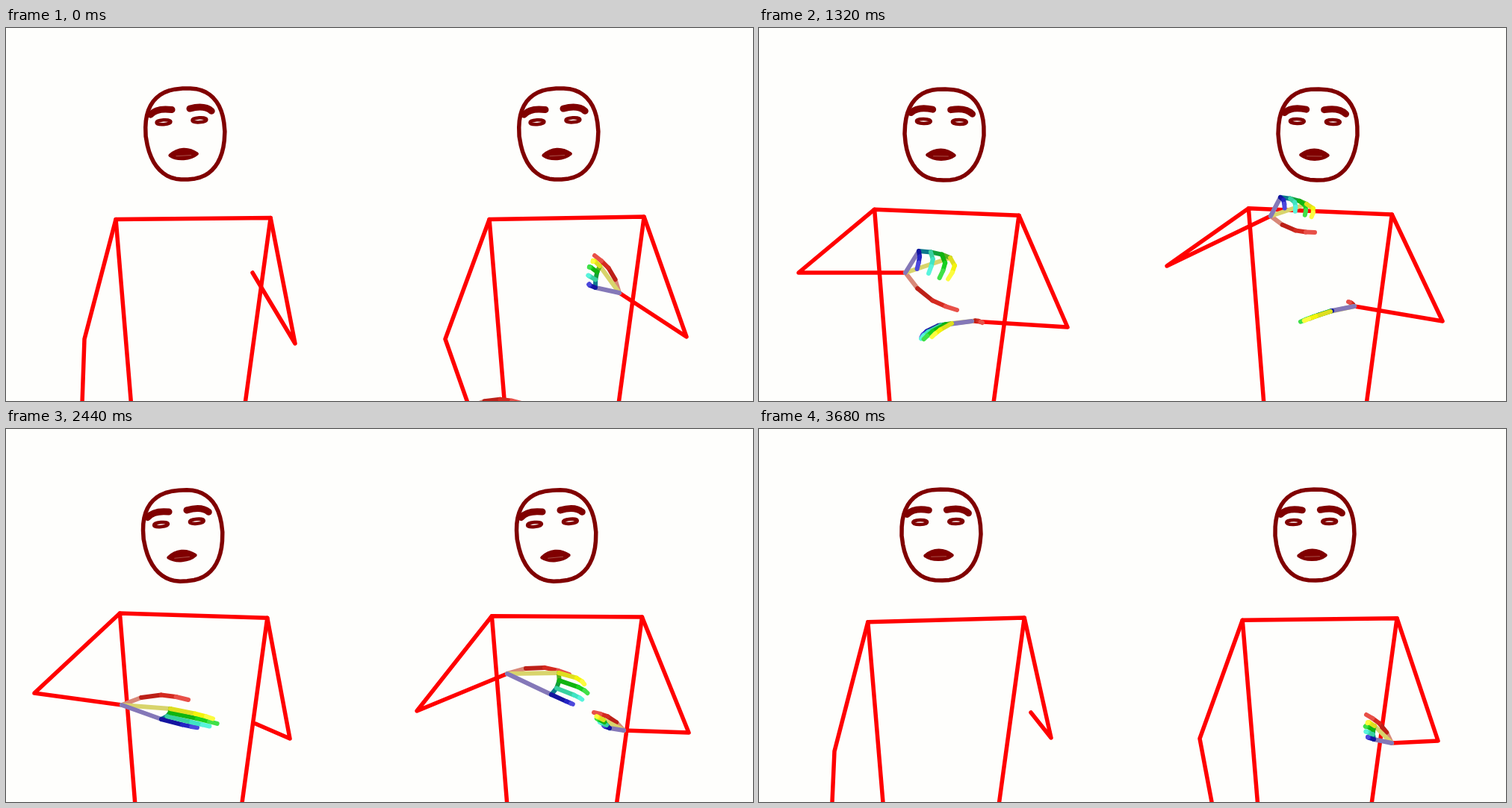
An HTML page with a canvas for the animation above (3720 ms loop, 1000 px wide and 500 px high).

```html
<!DOCTYPE html>
<html lang="en">
<head>
<meta charset="utf-8">
<title>Pose pair</title>
<style>
html, body { margin: 0; width: 100%; height: 100%; overflow: hidden; background: #fefefc; }
canvas { display: block; width: 1000px; height: 500px; }
</style>
</head>
<body>
<canvas id="stage" width="1000" height="500"></canvas>
<script>
const ctx = document.getElementById('stage').getContext('2d');
const LOOP = 3720, STEP = 40;
const TIMES = [0, 880, 1320, 1760, 2440, 2960, 3680];

// Centre of the head; both figures share it
const head = [[240,142], [248,143], [248,143], [248,136], [237,143], [236,143], [244,142]];

// arms: left elbow, left wrist, right elbow, right wrist
// hands: index knuckle, little knuckle, finger direction, thumb tip, all from the wrist
const figures = [
  {
    x: 0, swing: 35,
    arms: [
      [105,417, 100,560, 387,423, 330,328],
      [33,312, 170,266, 417,394, 313,368],
      [53,328, 196,328, 413,401, 285,393],
      [22,353, 70,469, 422,384, 394,540],
      [38,354, 155,370, 380,415, 334,395],
      [107,390, 193,381, 377,413, 300,399],
      [101,432, 95,568, 391,414, 364,380]
    ],
    left: { first: 1, rows: [
      [45,-30, 32,-44, 25,28, 82,37],
      [60,-20, 18,-29, -3,30, 69,50],
      [18,47, -33,45, 0,50, 46,75],
      [65,5, 53,19, 60,14, 89,-7],
      [55,4, 49,17, 46,8, 93,3]
    ] },
    right: { first: 1, from: 400, to: 1720, rows: [
      [-30,-1, -47,2, -32,18, -11,-10],
      [-27,3, -45,6, -28,19, 14,2]
    ] }
  },
  {
    x: 500, swing: 18,
    arms: [
      [88,417, 120,508, 411,414, 321,355],
      [54,297, 188,231, 415,397, 295,386],
      [46,319, 185,252, 415,393, 297,373],
      [52,344, 70,357, 414,397, 393,494],
      [50,378, 171,328, 414,407, 327,404],
      [65,388, 199,334, 411,405, 302,386],
      [90,415, 110,521, 409,418, 347,421]
    ],
    left: { first: 0, rows: [
      [50,20, 40,35, 15,10, 70,-5],
      [52,-16, 12,-26, 16,10, 60,27],
      [48,-16, 13,-25, 7,18, 59,22],
      [22,47, -27,45, -1,52, 43,75],
      [69,-1, 59,28, 36,16, 83,1],
      [68,-3, 55,31, 22,16, 70,-3]
    ] },
    right: { first: 0, rows: [
      [-26,-36, -32,-7, -10,-6, -33,-50],
      [-35,5, -40,11, -32,11, -27,-6],
      [-32,7, -30,6, -37,13, -8,-6],
      [-40,6, -18,35, -10,27, -55,6],
      [-27,-14, -19,-3, -10,-5, -40,-24],
      [-26,-28, -28,2, -9,-3, -33,-44],
      [-23,-23, -24,-5, -10,-4, -34,-38]
    ] }
  }
];

const DARK = '#800000', RED = '#ff0000';
const THUMB = ['#d88878', '#bc2018', '#d42a20', '#e85048'];
const FINGERS = [
  { reach: 0.95, colors: ['#dede20', '#f4f40c', '#fcfc40'] },
  { reach: 1.05, colors: ['#10b410', '#18d020', '#40e048'] },
  { reach: 0.95, colors: ['#38d0a0', '#40e4c4', '#58f4dc'] },
  { reach: 0.8, colors: ['#1414a0', '#2424c4', '#4c48dc'] }
];
const KNUCKLES = ['#58b020', '#10a038', '#0c788c'];

const clamp = (v, a, b) => Math.max(a, Math.min(b, v));
const mix = (a, b, u) => a.map((v, i) => v + (b[i] - v) * u);
const sum = (p, kp, q, kq) => p.map((v, i) => v * kp + q[i] * kq);
const bend = (v, n) => Math.sign(v) * Math.abs(v) ** n;
const pairs = a => Array.from({ length: a.length / 2 }, (_, i) => a.slice(2 * i, 2 * i + 2));

function phase(t) {
  let i = 0;
  while (i < TIMES.length - 2 && t >= TIMES[i + 1]) i++;
  const u = (t - TIMES[i]) / (TIMES[i + 1] - TIMES[i]);
  return { t, i, u: (1 - Math.cos(Math.PI * u)) / 2, bump: Math.sin(Math.PI * u) };
}

function pose(rows, p, first = 0) {
  const at = n => rows[clamp(n - first, 0, rows.length - 1)];
  return mix(at(p.i), at(p.i + 1), p.u);
}

function trace(pts, color, width) {
  ctx.beginPath();
  pts.forEach(q => ctx.lineTo(q[0], q[1]));
  ctx.strokeStyle = color;
  ctx.lineWidth = width;
  ctx.stroke();
}

const chain = (pts, colors) => colors.forEach((c, i) => trace([pts[i], pts[i + 1]], c, 6));

function drawHead(x, y) {
  ctx.save();
  ctx.translate(x, y);
  ctx.rotate((x % 500 - 246) * 0.01); // leans towards the side it moves to
  const outline = Array.from({ length: 49 }, (_, i) => {
    const a = i * Math.PI / 24, s = bend(Math.sin(a), 0.8);
    return [53 * bend(Math.cos(a), 0.8) * (1 - 0.1 * Math.max(0, s)), 61 * s];
  });
  trace(outline, DARK, 5.5);
  ctx.translate(-4, -17.5);
  for (const side of [-1, 1]) {
    ctx.beginPath();
    ctx.moveTo(41 * side, -11);
    ctx.quadraticCurveTo(32 * side, -20, 12 * side, -16);
    ctx.lineWidth = 9;
    ctx.stroke();
    ctx.beginPath();
    ctx.ellipse(24 * side, 0, 9.5, 3, 0, 0, 7);
    ctx.lineWidth = 4.5;
    ctx.stroke();
  }
  ctx.fillStyle = DARK;
  ctx.beginPath();
  ctx.moveTo(-18, 45);
  ctx.bezierCurveTo(-7, 36, 7, 36, 18, 45);
  ctx.bezierCurveTo(9, 52, -9, 52, -18, 45);
  ctx.fill();
  ctx.stroke();
  trace([[-10, 46.5], [10, 46.5]], '#a85048', 1);
  ctx.restore();
}

function drawBody([le, lw, re, rw]) {
  // a raised elbow lifts its shoulder and draws both together
  const rise = le[1] - 300;
  const ls = [157 - rise * 0.085, 239 + rise * 0.15];
  const rs = [346 + rise * 0.07, 251 + (re[1] - 400) * 0.15];
  trace([lw, le, ls, rs, re, rw], RED, 5.5);
  trace([ls, [ls[0] + 21, 510]], RED, 5.5);
  trace([rs, [rs[0] - 35, 510]], RED, 5.5);
}

function thumbLine(tip, little) {
  const side = tip[0] * little[1] > tip[1] * little[0] ? 1 : -1;
  const out = [tip[1] * side, -tip[0] * side];
  return [0, 0.3, 0.6, 0.82, 1].map(u => sum(tip, u, out, 0.11 * Math.sin(Math.PI * u)));
}

function drawHand(hand, p, wrist) {
  if (p.t < hand.from || p.t > hand.to) return;
  const [index, little, dir, thumb] = pairs(pose(hand.rows, p, hand.first));
  ctx.save();
  ctx.translate(...wrist);
  const fingers = FINGERS.map(({ reach }, i) => {
    const base = mix(index, little, i / 3).map(v => v * (i % 3 ? 1.06 : 1));
    return [[0, 0], [0.45, 0.12], [0.75, 0.08], [1, 0]]
      .map(([along, bow]) => sum(base, 1 + bow, dir, along * reach));
  });
  chain(thumbLine(thumb, little), THUMB);
  trace([[0, 0], index], '#d8d46c', 6);
  trace([[0, 0], little], '#8478b8', 6);
  chain(fingers.map(f => f[0]), KNUCKLES);
  for (let i = 3; i >= 0; i--) chain(fingers[i], FINGERS[i].colors);
  ctx.restore();
}

function drawFigure(fig, p) {
  const joints = pairs(pose(fig.arms, p));
  joints[0][0] -= fig.swing * p.bump;
  joints[2][0] += fig.swing * p.bump;
  const [hx, hy] = pose(head, p);
  ctx.save();
  ctx.translate(fig.x, 0);
  drawBody(joints);
  drawHead(hx, hy - 4 * p.bump);
  drawHand(fig.left, p, joints[1]);
  drawHand(fig.right, p, joints[3]);
  ctx.restore();
}

function tick() {
  const t = Math.floor(performance.now() % LOOP / STEP) * STEP;
  ctx.fillStyle = '#fefefc';
  ctx.fillRect(0, 0, 1000, 500);
  ctx.lineCap = ctx.lineJoin = 'round';
  figures.forEach(fig => drawFigure(fig, phase(t)));
  requestAnimationFrame(tick);
}
tick();
</script>
</body>
</html>
```
